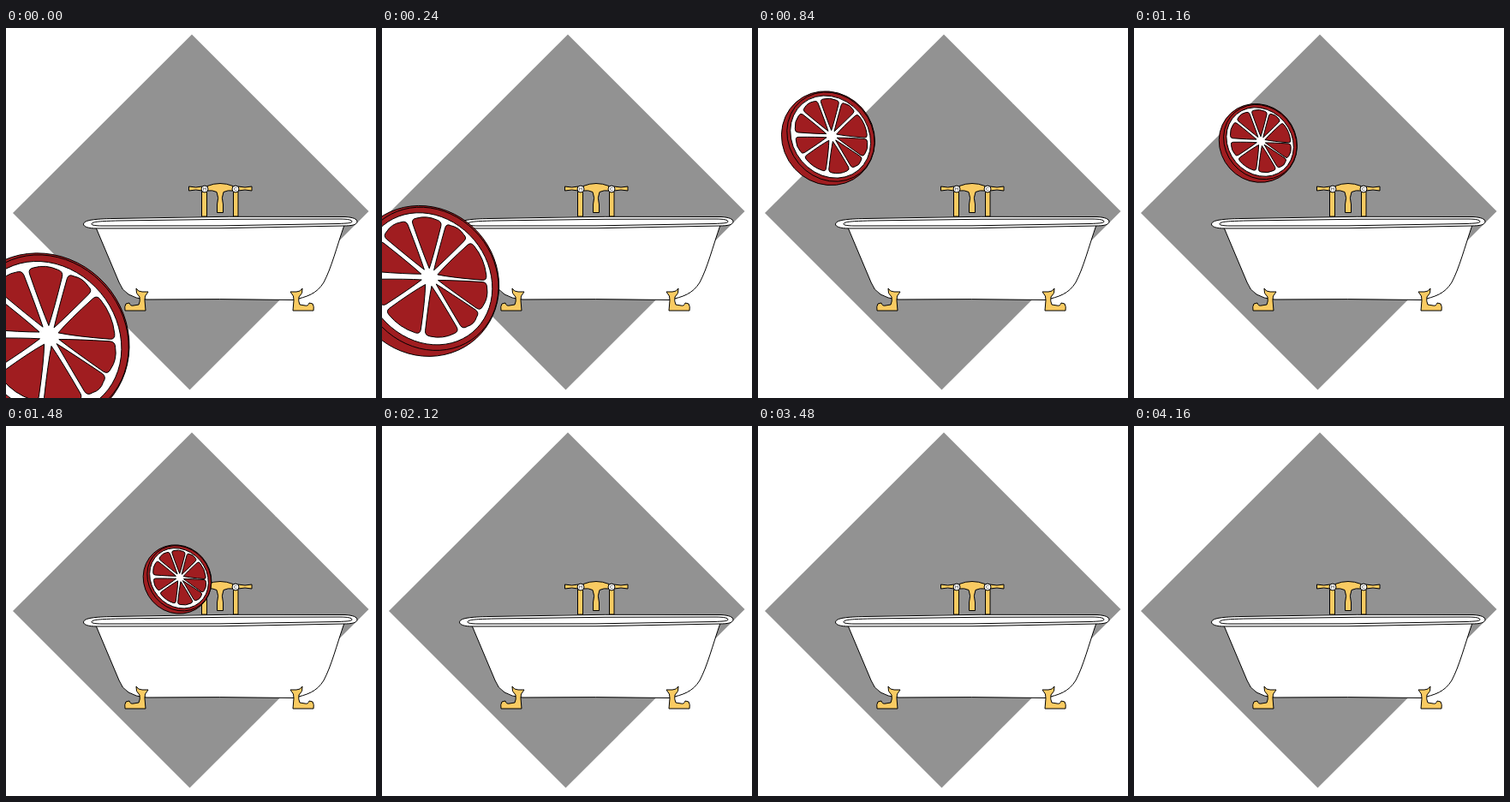
Animation, 432 px wide and 432 px high, one loop 4.2 s. Source, as an HTML page:

```html
<!DOCTYPE html>
<html lang="en">
<head>
<meta charset="utf-8">
<title>Fruit bath</title>
<style>
html, body { margin: 0; width: 100%; height: 100%; overflow: hidden; background: #fff; }
svg { display: block; width: 100vw; height: 100vh; }
.ink { stroke: #000; stroke-width: 1; stroke-linejoin: round; }
.ink * { vector-effect: non-scaling-stroke; }
.gold { fill: #f9cb62; }
.red { fill: #a01d20; }
.white { fill: #fff; }
text { font: 5.5px "Liberation Sans", sans-serif; text-anchor: middle; fill: #222; }
</style>
</head>
<body>
<svg viewBox="0 0 432 432">
  <defs>
    <clipPath id="inside"><path d="M0 0H432V228H396Q250 232 104 231H0Z"/></clipPath>
    <path id="foot" d="M152 304Q154 308 159 308L166 308Q161 313 162 318L163 330H139Q138 325 140 322L144 321Q145 325 149 324L155 323Q157 319 156 314Q151 310 152 304Z"/>
  </defs>
  <path fill="#929292" d="M217 7.500L423.500 214L214.500 422.500L8 216Z"/>

  <g class="ink gold">
    <path d="M228.500 191H234.500V220H228.500ZM265.500 191H271V220H265.500Z"/>
    <path d="M213.500 185Q222 187 229 185V190Q222 188 213.500 190ZM287 185Q279 187 271 185V190Q279 188 287 190Z"/>
    <path d="M235 184.500Q250 178.500 265 184.500V190Q259 189 254 191.500Q251 198 253.500 206V215.500H246.500V206Q249 198 246 191.500Q241 189 235 190Z"/>
    <circle class="white" cx="232" cy="188" r="4"/>
    <circle class="white" cx="268" cy="188" r="4"/>
  </g>
  <text x="232" y="190">H</text>
  <text x="268" y="190">C</text>

  <g class="ink white">
    <path d="M105 233L132 297Q138 315 164 317Q250 316 335 317.500C352 314 363 310 371 297C380 280 386 256 395 230Z"/>
    <path d="M90.500 229C91 224 104 223 125 222.500Q260 219 396 220.500C405 221 410 223 410 226C410 230 403 231 394 231Q250 235 106 234C96 234 90.500 232 90.500 229Z"/>
    <path d="M100 228.500C101 225.500 117 225.500 130 225Q260 222.500 390 223C399 223 404 224 404 226C404 228 397 228 388 228.500Q250 232 112 231C104 231 99 230 100 228.500Z"/>
  </g>
  <g class="ink gold">
    <use href="#foot"/>
    <use href="#foot" transform="translate(498 0) scale(-1 1)"/>
  </g>

  <g id="mask">
    <g id="fruit" class="ink red">
      <ellipse rx="104.500" ry="98" transform="translate(-7.500 5) rotate(48)"/>
      <ellipse rx="101" ry="90" transform="translate(-2 2) rotate(50)"/>
      <ellipse class="white" rx="94" ry="81.500" transform="translate(-2.500 2) rotate(50)"/>
      <path id="pulp"/>
    </g>
  </g>
  <g id="drop" class="ink" fill="#b9def0"><path d="M0 -7Q5 0 5 3A5 5 0 0 1 -5 3Q-5 0 0 -7Z"/></g>
</svg>
<script>
const LOOP = 4200, STEP = 40;
const byId = id => document.getElementById(id);
const fruit = byId("fruit"), mask = byId("mask"), drop = byId("drop");

// Wedges as start and end angles in degrees
const wedges = [[-107, -77], [-72, -46], [-40, 3], [5, 33], [35, 57],
  [61, 94], [99, 142], [148, 178], [186, 217], [222, 248]];

// Radius of the tilted oval that holds the pulp
function pulpRadius(deg) {
  const q = (deg - 50) * Math.PI / 180;
  return 1 / Math.hypot(Math.cos(q) / 84, Math.sin(q) / 74);
}

function wedge([a, b]) {
  const at = (deg, k) => {
    const q = deg * Math.PI / 180, r = k * pulpRadius(deg);
    return `${(r * Math.cos(q) - k).toFixed(1)} ${(r * Math.sin(q)).toFixed(1)}`;
  };
  const mid = (a + b) / 2;
  return `M${at(mid, .15)}Q${at(a + 2, .4)} ${at(a, .92)}Q${at(a, 1)} ${at(a + 5, 1)}` +
    `Q${at(mid, 1.05)} ${at(b - 5, 1)}Q${at(b, 1)} ${at(b, .92)}Q${at(b - 2, .4)} ${at(mid, .15)}Z`;
}
byId("pulp").setAttribute("d", wedges.map(wedge).join(""));

// time, x, y, scale
const keys = [
  [0, 50.5, 359.5, 1], [520, 64, 212, .71], [840, 86, 126, .54], [980, 111, 114, .5],
  [1120, 141, 127, .46], [1480, 203, 177, .395], [1680, 240, 206, .37], [2080, 308, 268, .35]
];

function slope(i, c) {
  const a = keys[Math.max(i - 1, 0)], b = keys[Math.min(i + 1, keys.length - 1)];
  return (b[c] - a[c]) / (b[0] - a[0]);
}

function track(t, c) {
  let i = 0;
  while (i < keys.length - 2 && t > keys[i + 1][0]) i++;
  const a = keys[i], b = keys[i + 1], d = b[0] - a[0];
  const u = (t - a[0]) / d, v = 1 - u;
  return a[c] * v * v * (1 + 2 * u) + b[c] * u * u * (3 - 2 * u) +
    d * u * v * (v * slope(i, c) - u * slope(i + 1, c));
}

function show(el, on) { el.setAttribute("visibility", on ? "visible" : "hidden"); }

function draw(t) {
  const flying = t < 2080;
  show(fruit, flying);
  if (flying) {
    fruit.setAttribute("transform",
      `translate(${track(t, 1)} ${track(t, 2)}) scale(${track(t, 3)})`);
    mask.setAttribute("clip-path", t > 1000 ? "url(#inside)" : "none");
  }
  const splash = t >= 2480 && t < 2800;
  show(drop, splash);
  if (splash) {
    const u = (t - 2480) / 280;
    drop.setAttribute("transform", `translate(${322 + 49 * u} ${212 - 324 * u * (1 - u)})`);
  }
}

const start = performance.now();
function tick() {
  const t = (performance.now() - start) % LOOP;
  draw(Math.floor(t / STEP) * STEP);
  requestAnimationFrame(tick);
}
draw(0);
requestAnimationFrame(tick);
</script>
</body>
</html>
```
